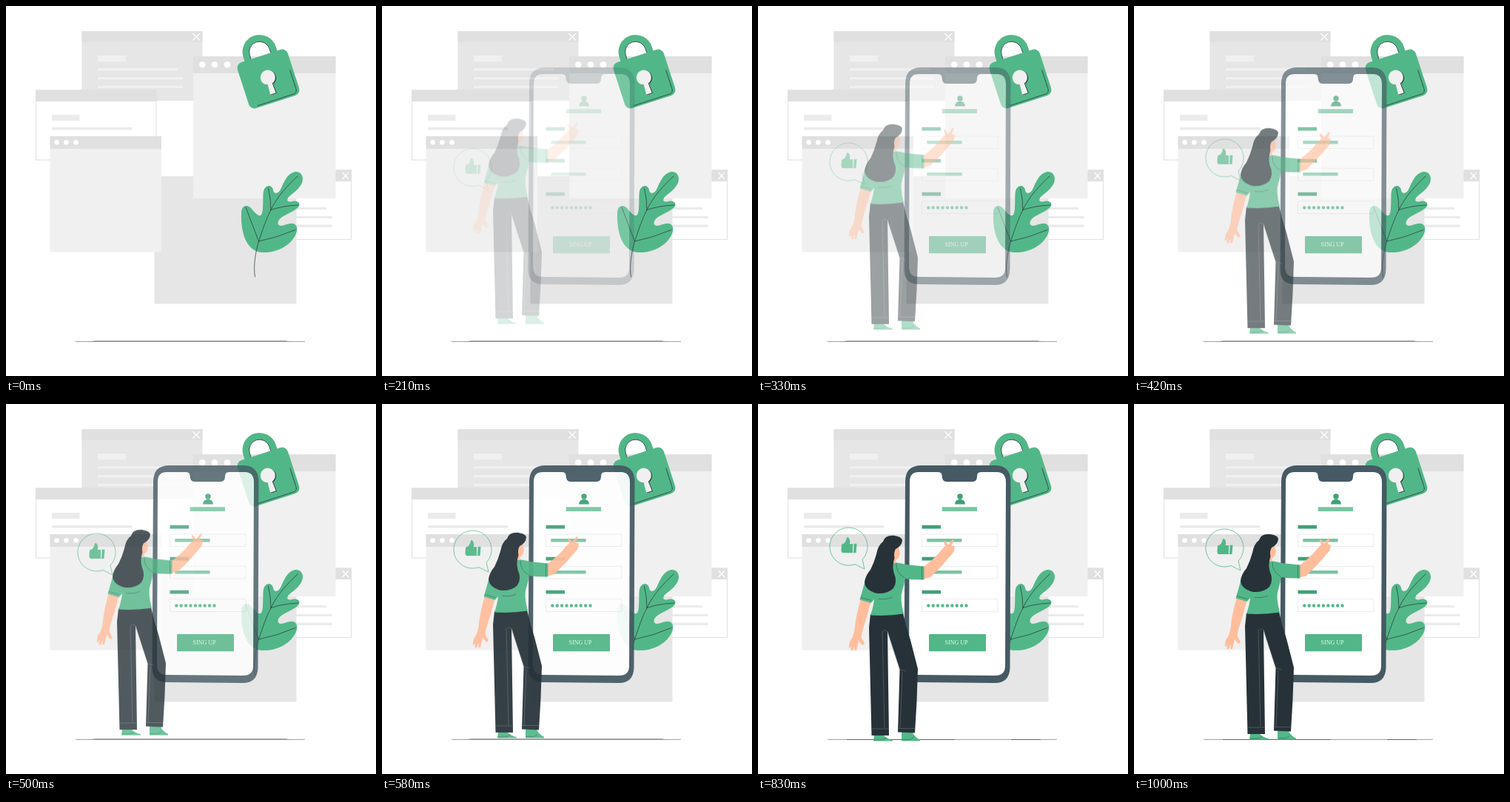
An HTML page for the animation above (1040 ms loop, 500x500 px).

```html
<!DOCTYPE html>
<html lang="en">
<head>
<meta charset="utf-8">
<title>Sign up</title>
<style>
  html, body { margin: 0; width: 100%; height: 100%; overflow: hidden; background: #fff; }
  svg { display: block; width: 100vw; height: 100vh; }
  .head { fill: #e0e0e0; }
  .pale { fill: #f0f0f0; }
  .mid { fill: #e6e6e6; }
  .card { fill: #fff; stroke: #e0e0e0; }
  .white { fill: #fff; }
  .cross { fill: none; stroke: #fff; stroke-width: 1.3; }
  .green { fill: #52b788; }
  .dark { fill: #263238; }
  .skin { fill: #ffbd9b; }
  .label { fill: #41a077; }
  .value { fill: #78c5a1; }
  .field { fill: none; stroke: #e8e8e8; stroke-width: .8; }
  .ink { fill: none; stroke: #263238; stroke-width: .7; stroke-linecap: round; }
  .seam { fill: none; stroke: #6d7a80; stroke-width: .5; }
  text { font: 8px "Liberation Serif", "Times New Roman", serif; fill: #e9f6ef; text-anchor: middle; }
</style>
</head>
<body>
<svg viewBox="0 0 500 500">
  <!-- windows -->
  <rect class="mid" x="102.5" y="34" width="163" height="94"/>
  <rect class="head" x="102.5" y="34" width="163" height="15"/>
  <path class="cross" d="M252.500 37l9.500 9.500m0-9.500l-9.500 9.500"/>
  <path class="pale" d="M124 67h38v8.300h-38zM124 84h108v3.500h-108zM124 96h115v3.500h-115zM124 107.500h115v3.500h-115z"/>

  <rect class="card" x="40.500" y="114" width="162.500" height="94"/>
  <rect class="head" x="40" y="113.500" width="163.500" height="15.500"/>
  <path fill="#ebebeb" d="M62 147h37.500v8h-37.500zM62 164h108v3.500h-108z"/>

  <rect class="card" x="303.500" y="222" width="163" height="93.500"/>
  <rect class="head" x="303" y="221.500" width="164" height="15.500"/>
  <path class="cross" d="M454.500 225l8.500 9m0-9l-8.500 9"/>
  <path fill="#ebebeb" d="M325 272h108v3h-108zM325 284h115.500v3h-115.500zM325 295.500h115.500v3.500h-115.500z"/>

  <rect class="mid" x="200.500" y="230" width="192" height="172.500"/>

  <rect class="pale" x="253" y="68" width="192.500" height="192"/>
  <rect class="head" x="253" y="68" width="192.500" height="23"/>
  <g class="white"><circle cx="265.300" cy="79.300" r="4.300"/><circle cx="282" cy="79.300" r="4.300"/><circle cx="299" cy="79.300" r="4.300"/></g>

  <rect class="pale" x="59.500" y="176" width="150.500" height="156.500"/>
  <rect class="head" x="59.500" y="176" width="150.500" height="17"/>
  <g class="white"><circle cx="68.500" cy="184.200" r="3.300"/><circle cx="81.500" cy="184.200" r="3.300"/><circle cx="94.500" cy="184.200" r="3.300"/></g>

  <!-- ground -->
  <path d="M94 453.500H404" stroke="#8c8c8c" stroke-width=".8"/>
  <path id="groundBefore" d="M112 454L120 452.300H378L386 454z" fill="#929292"/>
  <path id="groundAfter" d="M120 453.500H266M342 453.500H382" stroke="#555" stroke-width=".8"/>

  <!-- padlock -->
  <g transform="translate(354.500 98.500) rotate(-18)">
    <path d="M-18.500-28V-38.300a18.500 18.500 0 0 1 37 0V-28" fill="none" stroke="#52b788" stroke-width="9.200"/>
    <path class="ink" d="M-14-33V-38.300a14 14 0 0 1 28 0V-33"/>
    <rect class="green" x="-35.700" y="-32.600" width="71.400" height="65.200" rx="8"/>
    <path class="ink" d="M-25 30H26Q31.500 30 31.500 24V-2"/>
    <path class="dark" transform="translate(.9 .9)" d="M-3.200 7.500A10 10 0 1 1 3.200 7.500L4 21H-4z"/>
    <path class="pale" d="M-3.200 7.500A10 10 0 1 1 3.200 7.500L4 21H-4z"/>
  </g>

  <!-- leaf -->
  <path class="green" d="M345 333C325 331 317 306 318 280C318 270 325 267 331 273C336 279 340 284 344 283C348 281 347 268 347.500 254C348 241 359 240 361 248C361 254 367 255 371 248C376 237 380 227 389 224.500C396 222.500 401 227 401 234C401 244 389 252 383 257C379 261 379 265 385 264.500C392 262 397 265 396.500 269C395 275 383 279 375 284C367 288 365 296 371 297C377 297 382 293 388 294C395 296 394 304 391 310C383 325 365 334 345 333z"/>
  <path class="ink" d="M336.500 366C334 352 337 333 341.500 318C348 299 351 289 358 275.500C366 258 381 242 394 230M341.500 318L324 272M341.500 318Q367 313 391 302.500M358 275.500Q374 270 395 269M358 275.500Q358 260 354.500 246"/>

  <!-- phone -->
  <g id="phone">
    <path fill="#455a64" d="M221 83H322Q342 84 341.500 106L340.500 356Q340 377 320 377L216 376Q197 375 197.500 355L199 105Q199 83 221 83z"/>
    <path class="white" d="M217 92H243Q248 92 248.500 96Q248.500 105 255 105H290Q296 105 296 98Q296 92 301 92H323Q335 92 335 106L334 354Q334 367 320 367L217 366Q204 366 204 352L205 105Q205 92 217 92z"/>
    <g class="label">
      <circle cx="273" cy="125" r="3.700"/>
      <path d="M266 135.500Q266.500 129 273 128.700Q279.500 129 280 135.500z"/>
      <path d="M221.500 163.700H247V168.500H221.500zM221.500 206.800H247V211.500H221.500zM221.500 251.700H247V256.500H221.500z"/>
    </g>
    <path class="field" d="M221.500 176H324V192.500H221.500zM221.500 219.300H324V236H221.500zM221.500 263.700H324V280.500H221.500z"/>
    <path class="value" d="M248.700 139.300H296V145H248.700zM228.300 182H275.500V186.500H228.300zM228.300 225H275.500V229.500H228.300z"/>
    <path d="M230.300 272.500H282" stroke="#52b788" stroke-width="4.400" stroke-linecap="round" stroke-dasharray="0 6.400"/>
    <rect class="green" x="231" y="311" width="77" height="23.300" rx="1"/>
    <text x="268" y="325">SING UP</text>
  </g>

  <!-- speech bubble -->
  <g id="bubble">
    <path d="M131 218.500A25.500 25.500 0 1 1 141 212L144 225z" fill="none" stroke="#52b788" stroke-width=".8"/>
    <path class="green" d="M113 191.500Q119 190 119.800 183Q121 181 123 183.500Q125 186 123.700 191H128V203H114.500Q112 202 112.500 198zM129.500 190.700H133.500L132.500 203H129z"/>
  </g>

  <!-- woman -->
  <g id="woman">
    <path class="green" d="M157 445H169Q173 450 182 452.300V453.500H156zM194 440H208Q211 448 219 451.800V453.500H194z"/>
    <path class="ink" d="M157 452H168l5-2.500M195 451.500H206l4-3" stroke-opacity=".5"/>
    <path class="skin" d="M139 261Q132 285 130.500 303Q129 313 124 319L122.500 327L124.500 328L126 325L125.500 331L128 331.500L130.500 325L130.500 331L133 331L136 318L141 324L144 322L139.500 313Q141 303 146 289L153 264z"/>
    <path class="dark" d="M152 282L196 280.500Q200 300 206 317L216 356Q215 400 212 442.500L189 441.500L191.500 357L175 305L177 446H153.500L150 300z"/>
    <path class="seam" d="M168 306Q172 302 175 306L192 357L200 359M168 306L171 436M154 437H177M190 436.500H212M195 360L192 436"/>
    <path class="skin" d="M223 218.500Q239 207 248 195L253 190L250.500 184L252.500 183L257 188.500L263 181L265 182L261.500 189L266 190.500L264.500 198Q250 216 233 232L223 235z"/>
    <path class="green" d="M185 212Q193 213 200 215L224.500 217.500V235.500Q210 236 198.500 234Q198 242 195 250Q191 261 197 281.500Q175 285 152 283.500Q156 272 157 262L152.500 267L137.500 262.500L146 233z"/>
    <path class="ink" d="M221.500 218V235M139 259.500L153 263.500M163 261.500Q172 263 181 259.500M187 214Q186 226 198 233" stroke-opacity=".6"/>
    <path class="skin" d="M180 193L189 190L191.800 198Q191.500 207 186.500 208.500V213H179z"/>
    <path class="dark" d="M169 184Q171 175.500 183 175.700Q194 177 195 182Q194.500 190 186 194Q183 199 184.500 206Q181 217 183.500 226Q189 238 183 247Q175 255 161 254Q145 250 144 239Q145 230 152 222Q157 212 160 201Q162 189 169 184z"/>
  </g>
</svg>
<script>
  const LOOP = 1040, FPS = 24, LEAD = 32;
  const byId = id => document.getElementById(id);

  const enter = (id, dy) => {
    const anim = byId(id).animate(
      [{ opacity: 0, transform: `translateY(${dy}px)` }, { opacity: 1, transform: "translateY(0px)" }],
      { duration: 1000, easing: "cubic-bezier(.36,-.01,.5,1.38)", fill: "both" }
    );
    anim.pause();
    return anim;
  };
  const parts = [enter("phone", 0), enter("woman", -30), enter("bubble", 30)];

  function draw(ms) {
    // step starts are rounded to 10 ms
    const step = Math.floor((Math.floor(ms / 10) + 0.499) * FPS / 100);
    const time = step < 2 ? 0 : Math.min(1000, step * 1000 / FPS + LEAD);
    for (const part of parts) part.currentTime = time;
    const landed = step >= 15;
    byId("groundBefore").style.display = landed ? "none" : "";
    byId("groundAfter").style.display = landed ? "" : "none";
  }

  const start = performance.now();
  function tick() {
    draw((performance.now() - start) % LOOP);
    requestAnimationFrame(tick);
  }
  draw(0);
  requestAnimationFrame(tick);
</script>
</body>
</html>
```
